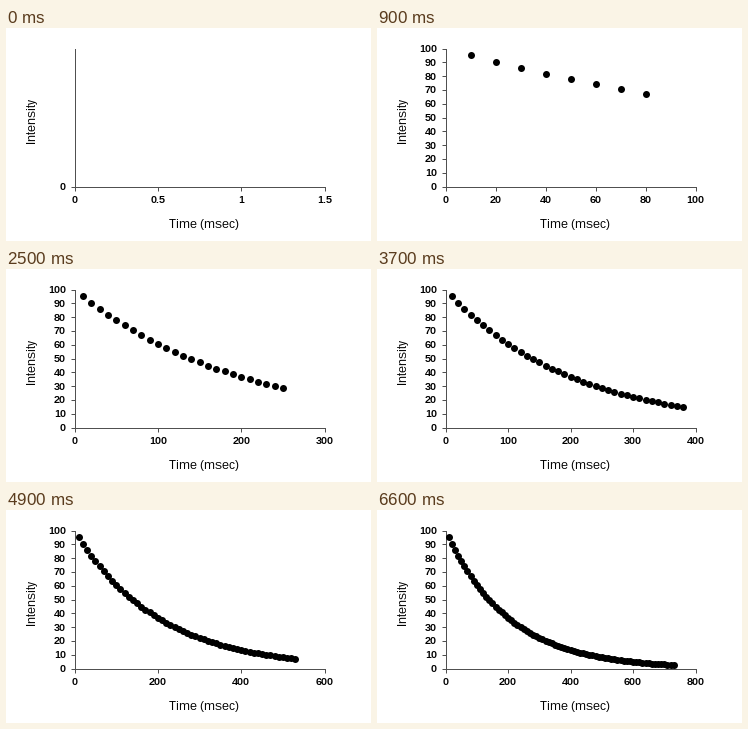
A matplotlib script for the animation above (6700 ms loop, 365 px wide and 213 px high).

```python
import numpy as np
import matplotlib.pyplot as plt
from matplotlib.animation import FuncAnimation

W, H, DPI = 365, 213, 100
PX = 72 / DPI                      # one pixel in points
LEFT, RIGHT, TOP, BOTTOM = 68.5, 318.5, 20.5, 158.6
FRAMES, INTERVAL = 67, 100
AXIS = "#505050"

# Crisp, fully hinted small type
plt.rcParams.update({"font.family": "Liberation Sans",
                     "text.hinting": "native",
                     "text.hinting_factor": 1})

# Decay samples every 10 msec with a time constant of 200 msec
times = 10 * np.arange(1, 74)
levels = 100 * np.exp(-times / 200)

# The sampling rate rises slightly over the run
KEY_FRAMES = [0, 1, 4, 16, 25, 37, 49, 66]
KEY_COUNTS = [0, 1, 3, 16, 25, 38, 53, 73]


def point_count(frame):
    return int(np.interp(frame, KEY_FRAMES, KEY_COUNTS) + 1e-6)


def auto_ticks(low, high, max_steps):
    """Round limits outwards to the finest 1-2-5 step that fits."""
    for power in range(-1, 4):
        for base in (1, 2, 5):
            step = base * 10.0 ** power
            first = np.floor(low / step + 1e-9)
            last = np.ceil(high / step - 1e-9)
            if last - first <= max_steps:
                return np.arange(first, last + 1) * step


def x_ticks(n):
    return auto_ticks(0, 1.05 * (times[n - 1] if n else 1), 5)


def y_ticks(n):
    if n == 0:
        return np.array([0.0])
    low = levels[n - 1]
    spread = 100 - low
    return auto_ticks(0 if spread > 100 / 6 else low - 0.05 * spread, 100, 10)


def labels(ticks):
    return [f"{t:g}" for t in ticks]


fig = plt.figure(figsize=(W / DPI, H / DPI), dpi=DPI, facecolor="white")
ax = fig.add_axes([LEFT / W, 1 - BOTTOM / H,
                   (RIGHT - LEFT) / W, (BOTTOM - TOP) / H])
for side in ("top", "right"):
    ax.spines[side].set_visible(False)
for side in ("left", "bottom"):
    ax.spines[side].set(color=AXIS, linewidth=PX)
ax.tick_params(length=4 * PX, width=PX, pad=4.5 * PX, color=AXIS,
               labelcolor="black", labelsize=10 * PX)
ax.tick_params(axis="x", pad=5.5 * PX)

title = dict(fontsize=12 * PX, color="black", ha="center", va="center")
fig.text(198 / W, 1 - 196.8 / H, "Time (msec)", **title)
fig.text(25 / W, 1 - 92.5 / H, "Intensity", rotation=90, **title)

dots, = ax.plot([], [], "o", color="black", markersize=7 * PX,
                markeredgewidth=0, clip_on=False, zorder=5, snap=False)


def draw(frame):
    n = point_count(frame)
    xt, yt = x_ticks(n), y_ticks(n)
    ax.set_xticks(xt, labels(xt), fontweight="bold")
    ax.set_yticks(yt, labels(yt), fontweight="bold")
    ax.set_xlim(0, xt[-1])
    ax.set_ylim(yt[0], 100)
    dots.set_data(times[:n], levels[:n])
    return dots,


anim = FuncAnimation(fig, draw, frames=FRAMES, interval=INTERVAL,
                     init_func=lambda: draw(0), repeat=True, repeat_delay=0)
plt.show()
```
